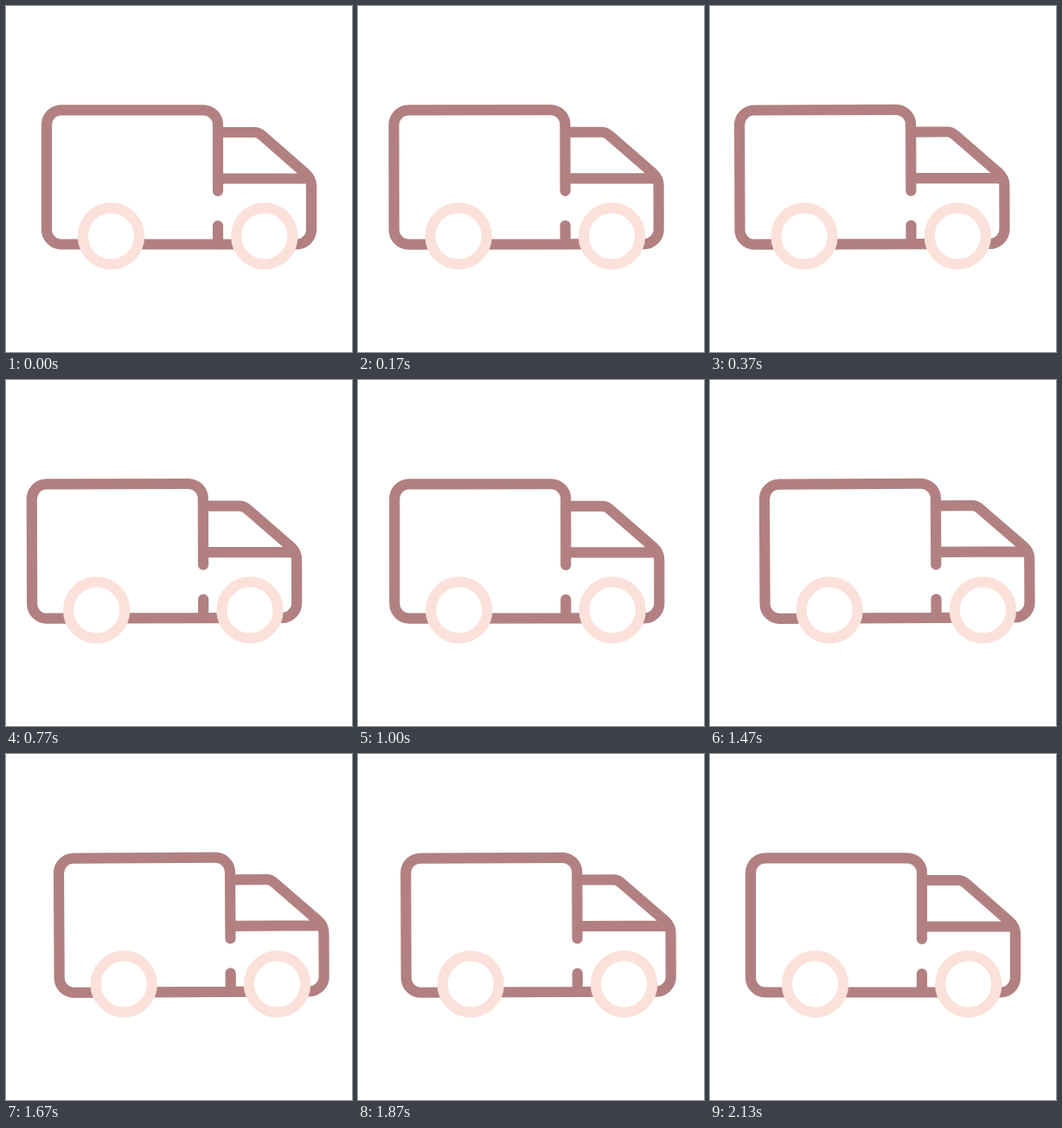
Animation of 400x400 px, one loop 4130 ms. Source, as an HTML page:

```html
<!DOCTYPE html>
<html lang="en">
<head>
<meta charset="utf-8">
<title>Rocking truck</title>
<style>
  html, body { margin: 0; width: 100%; height: 100%; overflow: hidden; background: #fff; }
  svg { display: block; width: 100%; height: 100%; }
  #body { fill: none; stroke: #b28081; stroke-width: 12.2; stroke-linejoin: round; }
  .wheel { fill: #fff; stroke: #fbe1da; stroke-width: 12.2; }
</style>
</head>
<body>
<svg viewBox="0 0 400 400">
  <g id="truck">
    <g id="body">
      <path stroke-linecap="round" d="M245 254V275.5H64A17 17 0 0 1 47 258.5V137A17 17 0 0 1 64 120.3H228A17 17 0 0 1 245 137V214"/>
      <path d="M245 146H287Q292 146 296 149.7L346 193.3Q353 199.5 353 208V258.5A17 17 0 0 1 336 275.5H245M245 199.5H350"/>
    </g>
    <circle class="wheel" cx="121.5" cy="266" r="32.6"/>
    <circle class="wheel" cx="298.8" cy="266" r="32.6"/>
  </g>
</svg>
<script>
  const LOOP = 4130, STEP = 100 / 3, STEPS = 64;
  const truck = document.getElementById('truck');
  const body = document.getElementById('body');
  // One swing to each side: width, skew of the curve, and body tilt in degrees
  const BACK = { reach: 17.4, skew: 3.45, tilt: 0.2 };
  const FORTH = { reach: 16, skew: 2.56, tilt: 0.32 };

  function draw(now) {
    const step = Math.min(STEPS, Math.floor((now % LOOP + 3.4) / STEP));
    const angle = step / STEPS * 2 * Math.PI;
    const swing = step < STEPS / 2 ? BACK : FORTH;
    const x = swing.skew * Math.sin(2 * angle) - swing.reach * Math.sin(angle);
    const tilt = -swing.tilt * Math.abs(Math.sin(angle));
    truck.setAttribute('transform', `translate(${x.toFixed(3)} 0)`);
    body.setAttribute('transform', `rotate(${tilt.toFixed(3)} 121.5 266)`);
  }

  const start = performance.now();
  function tick() {
    draw(performance.now() - start);
    requestAnimationFrame(tick);
  }
  tick();
</script>
</body>
</html>
```
